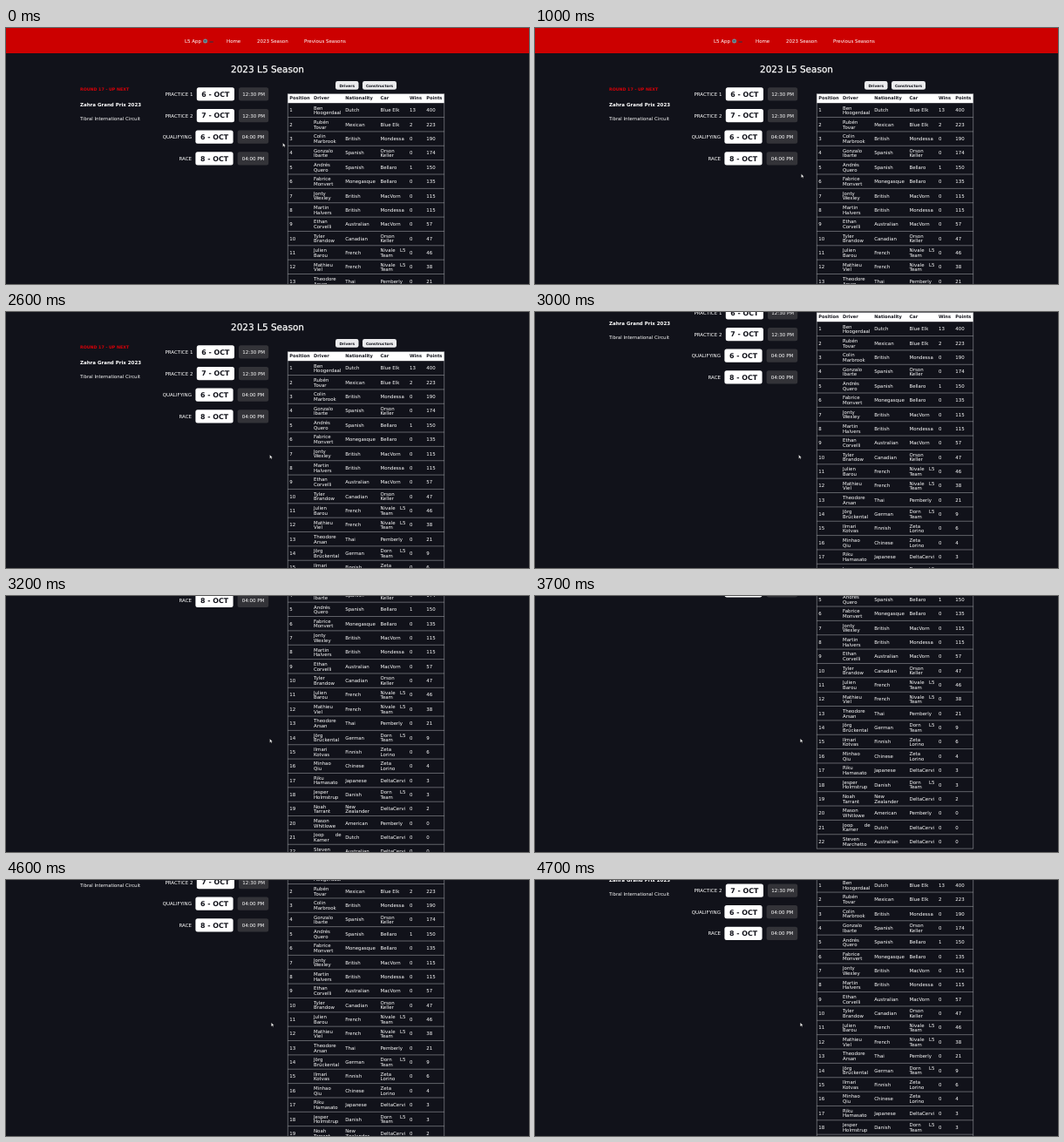
An HTML page that plays this animation: 600x294 px, repeating every 5000 ms.

```html
<!DOCTYPE html>
<html lang="en">
<head>
<meta charset="utf-8">
<title>Season standings</title>
<style>
  html, body { margin: 0; width: 100%; height: 100%; overflow: hidden; background: #11121a; }
  svg { display: block; width: 600px; height: 294px; }
  text {
    font: 5.5px "DejaVu Sans", Verdana, sans-serif;
    fill: #fff;
    text-rendering: geometricPrecision;
    white-space: pre;
  }
  .title { font-size: 10.5px; stroke: #fff; stroke-width: .25px; }
  .round { font-size: 4.75px; font-weight: bold; fill: #d80008; }
  .event { font-weight: bold; }
  .place { font-size: 5.3px; }
  .date { font-size: 7.9px; font-weight: bold; fill: #11121a; }
  .button { font-size: 4.3px; font-weight: bold; fill: #11121a; }
  .head { font-size: 5.1px; font-weight: bold; fill: #11121a; }
  .cell { font-size: 5.45px; }
  .line { stroke: #85868c; stroke-width: .7px; fill: none; }
</style>
</head>
<body>
<svg viewBox="0 0 600 294">
  <g id="page"></g>
  <path id="cursor" d="M0 0V4.4L1.1 3.5L1.9 5L2.6 4.7L1.9 3.2H3.2Z" fill="#fff" stroke="#000" stroke-width=".3"/>
</svg>
<script>
const NS = "http://www.w3.org/2000/svg";
const page = document.getElementById("page");
const cursor = document.getElementById("cursor");

function add(tag, attrs, content = "") {
  const el = document.createElementNS(NS, tag);
  for (const key in attrs) el.setAttribute(key, attrs[key]);
  el.textContent = content;
  page.append(el);
}
const label = (x, y, content, cls = "", anchor = "start") =>
  add("text", { x, y, class: cls, "text-anchor": anchor }, content);
const box = (x, y, width, height, fill, rx = 0) =>
  add("rect", { x, y, width, height, fill, rx });

// Navigation
box(0, 0, 600, 29, "#cc0000");
[[205, "L5 App"], [253, "Home"], [288, "2023 Season"], [342, "Previous Seasons"]]
  .forEach(([x, name]) => label(x, 17, name));
add("circle", { cx: 228.6, cy: 15, r: 2.5, fill: "#6f8f9b" });
box(227, 14.2, 3.2, 1.4, "#3c555f", .6);
box(233.3, 15.2, 4.6, 1.5, "#5a2630", .6);

label(300, 50.6, "2023 L5 Season", "title", "middle");

// Next event
label(85, 72.4, "ROUND 17 - UP NEXT", "round");
label(85, 90, "Zahra Grand Prix 2023", "event");
label(85, 106, "Tibral International Circuit", "place");

[
  ["PRACTICE 1", "6 - OCT", "12:30 PM", 1.4],
  ["PRACTICE 2", "7 - OCT", "12:30 PM", 1.4],
  ["QUALIFYING", "6 - OCT", "04:00 PM", 0],
  ["RACE", "8 - OCT", "04:00 PM", 0]
].forEach(([session, date, time, shift], i) => {
  const y = 75.9 + i * 24.65;
  label(213 + shift, y + 2, session, "", "end");
  box(217.4 + shift, y - 7.6, 43.2, 15.2, "#fff", 2.5);
  label(239 + shift, y + 2.8, date, "date", "middle");
  box(265.6 + shift, y - 7.6, 35.6 - shift, 15.2, "#333338", 2.5);
  label(283.5 + shift / 2, y + 2, time, "", "middle");
});

// Standings
box(378, 61, 26.5, 9.8, "#ececee", 2.4);
label(391.2, 67.5, "Drivers", "button", "middle");
box(409, 61, 39, 9.8, "#ececee", 2.4);
label(428.5, 67.5, "Constructors", "button", "middle");

const TOP = 86.2, ROW = 16.36;
const COLS = [325.2, 353, 389.2, 429.5, 463, 482.3];
const RIGHT = { 1: 384.5, 3: 458.5 };

box(323, 75.6, 180, TOP - 75.6, "#fff");
["Position", "Driver", "Nationality", "Car", "Wins", "Points"]
  .forEach((name, i) => label(COLS[i], 82.3, name, "head"));

// "/" breaks a cell into lines
const ELK = "Blue Elk", MON = "Mondessa", ORS = "Orson/Keller", BEL = "Bellaro",
  MAC = "MacVorn", NIV = "Nivale L5/Team", PEM = "Pemberly", DOR = "Dorn L5/Team",
  ZET = "Zeta/Lorino", DEL = "DeltaCervi";
const standings = [
  ["Ben/Hoogerdaal", "Dutch", ELK, 13, 400],
  ["Rubén/Tovar", "Mexican", ELK, 2, 223],
  ["Colin/Marbrook", "British", MON, 0, 190],
  ["Gonzalo/Ibarte", "Spanish", ORS, 0, 174],
  ["Andrés/Quero", "Spanish", BEL, 1, 150],
  ["Fabrice/Monvert", "Monegasque", BEL, 0, 135],
  ["Jonty/Wexley", "British", MAC, 0, 115],
  ["Martin/Halvers", "British", MON, 0, 115],
  ["Ethan/Corvelli", "Australian", MAC, 0, 57],
  ["Tyler/Brandow", "Canadian", ORS, 0, 47],
  ["Julien/Barou", "French", NIV, 0, 46],
  ["Mathieu/Viel", "French", NIV, 0, 38],
  ["Theodore/Arsan", "Thai", PEM, 0, 21],
  ["Jörg/Brückental", "German", DOR, 0, 9],
  ["Ilmari/Kotvas", "Finnish", ZET, 0, 6],
  ["Minhao/Qiu", "Chinese", ZET, 0, 4],
  ["Riku/Hamasato", "Japanese", DEL, 0, 3],
  ["Jesper/Holmstrup", "Danish", DOR, 0, 3],
  ["Noah/Tarrant", "New/Zealander", DEL, 0, 2],
  ["Mason/Whitlowe", "American", PEM, 0, 0],
  ["Joop de/Kamer", "Dutch", DEL, 0, 0],
  ["Steven/Marchetto", "Australian", DEL, 0, 0]
];

function cell(col, y, value) {
  const lines = String(value).split("/");
  lines.forEach((line, i) => {
    const base = y + 2 + (i - (lines.length - 1) / 2) * 5.6;
    const [first, last] = line.split(" ");
    // A wrapped line is justified: its last word sits at the column's right edge
    if (last && i < lines.length - 1) {
      label(COLS[col], base, first, "cell");
      label(RIGHT[col], base, last, "cell", "end");
    } else {
      label(COLS[col], base, line, "cell");
    }
  });
}

standings.forEach((entry, i) => {
  const y = TOP + ROW * i;
  [i + 1, ...entry].forEach((value, col) => cell(col, y + ROW / 2, value));
  add("path", { d: `M323 ${y + ROW}H503`, class: "line" });
});
add("path", { d: `M323.3 75.6V${TOP + ROW * 22}M502.7 75.6V${TOP + ROW * 22}`, class: "line" });

// Held steps: [time, value]
const LOOP = 5000;
const scroll = [
  [0, 0], [2600, 30], [2700, 42], [2900, 55], [3000, 75], [3100, 112], [3200, 144.5],
  [3300, 153], [3400, 156], [4200, 119], [4300, 112], [4600, 98], [4700, 88.5]
];
const pointer = [
  [0, [317.6, 132]], [900, [311, 150]], [1000, [305.4, 167.6]], [1500, [303.2, 165]],
  [2600, [302.6, 164]], [3500, [303.2, 164]], [3700, [304.3, 163.8]]
];
const at = (steps, t) => steps.findLast(([start]) => start <= t)[1];

const begin = performance.now();
function draw(now) {
  const t = Math.max(0, now - begin) % LOOP;
  page.setAttribute("transform", `translate(0 ${-at(scroll, t)})`);
  cursor.setAttribute("transform", `translate(${at(pointer, t)})`);
  requestAnimationFrame(draw);
}
draw(begin);
</script>
</body>
</html>
```
